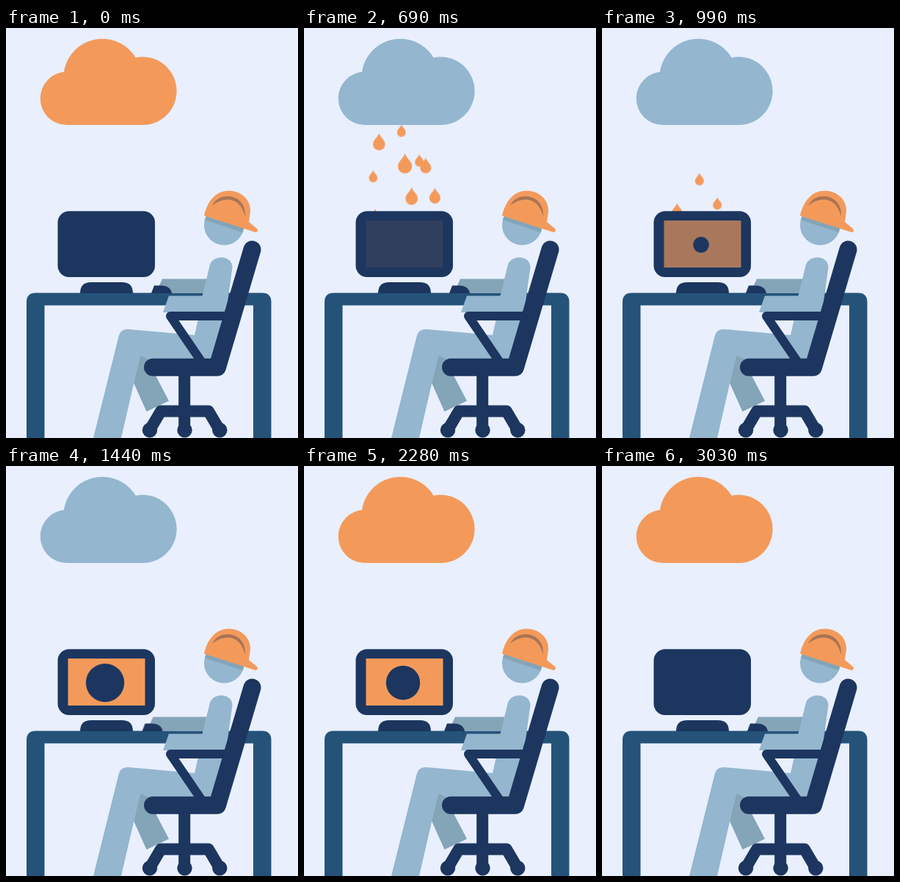
These frames come from a looping animation (398x558 px, 3180 ms). An HTML page without scripts:

```html
<!DOCTYPE html>
<html lang="en">
<head>
<meta charset="utf-8">
<title>Cloud to desk</title>
<style>
  :root {
    --navy: #1c365f;
    --desk: #255279;
    --skin: #94b6cf;
    --shade: #84a4b8;
    --orange: #f39a5b;
  }
  html, body { margin: 0; width: 100%; height: 100%; overflow: hidden; background: #e9effd; }
  svg { display: block; width: 398px; height: 558px; }

  .navy { fill: var(--navy); }
  .desk { fill: var(--desk); }
  .skin { fill: var(--skin); }
  .shade { fill: var(--shade); }
  .orange { fill: var(--orange); }
  .frame { fill: none; stroke: var(--navy); stroke-linecap: round; stroke-linejoin: round; }

  .cloud, .screen, .sweep, .mark, .hand, .drops use { animation: 3180ms linear infinite; }
  .cloud { animation-name: tint; }
  .screen { animation-name: glow; }
  .sweep { animation-name: sweep; fill: #1c365f; opacity: .04; }
  .mark { animation-name: pop; transform-origin: 135px 295px; }
  .hand { animation-name: reach; }

  /* --x, --y: place when the rain is fullest; --v: px per second; --r: size */
  .drops use { animation-name: fall; }

  @keyframes tint {
    0%, 3.77%, 71.07%, 100% { fill: #f39a5b; }
    20.75%, 50% { fill: #94b6cf; }
  }
  @keyframes glow {
    0%, 20.13%, 95.28%, 100% { opacity: 0; }
    36.79%, 80.03% { opacity: 1; }
  }
  @keyframes sweep {
    0%, 55.66% { transform: translate(0, 0); }
    70.75%, 100% { transform: translate(98px, -120px); }
  }
  @keyframes pop {
    0%, 21.38%, 94.34%, 100% { transform: scale(0); }
    45.28% { transform: scale(1.13); }
    50.31%, 84.59% { transform: scale(1); }
  }
  @keyframes reach {
    0%, 28.3%, 94.34%, 100% { transform: translateX(0); }
    45.28% { transform: translateX(-12.5px); }
    50.31%, 84.91% { transform: translateX(-7px); }
  }
  @keyframes fall {
    from { transform: translate(var(--x), calc(var(--y) - var(--v) * .69)) scale(var(--r)); }
    to { transform: translate(var(--x), calc(var(--y) + var(--v) * 2.49)) scale(var(--r)); }
  }
</style>
</head>
<body>
<svg viewBox="0 0 398 558">
  <defs>
    <path id="drop" d="M0-1.85C.25-1.1 1-.75 1 0A1 1 0 0 1-1 0C-1-.75-.25-1.1 0-1.85Z"/>
    <clipPath id="sky"><rect x="70" y="125" width="140" height="130"/></clipPath>
    <clipPath id="glass"><rect x="84.5" y="262" width="105" height="64"/></clipPath>
    <clipPath id="face"><circle cx="297.3" cy="268.3" r="27.3"/></clipPath>
  </defs>

  <g class="drops orange" clip-path="url(#sky)">
    <use href="#drop" style="--x:102.3px;--y:158px;--v:317px;--r:8.2"/>
    <use href="#drop" style="--x:132.8px;--y:142px;--v:220px;--r:6"/>
    <use href="#drop" style="--x:137.6px;--y:188px;--v:340px;--r:9.6"/>
    <use href="#drop" style="--x:157.2px;--y:182.5px;--v:195px;--r:6"/>
    <use href="#drop" style="--x:165.8px;--y:190px;--v:290px;--r:7.5"/>
    <use href="#drop" style="--x:94.3px;--y:204px;--v:205px;--r:5.8"/>
    <use href="#drop" style="--x:146.7px;--y:232px;--v:310px;--r:8.4"/>
    <use href="#drop" style="--x:178.4px;--y:231px;--v:290px;--r:7.6"/>
    <use href="#drop" style="--x:97px;--y:257px;--v:250px;--r:6"/>
  </g>

  <g class="cloud">
    <circle cx="83" cy="95.8" r="36.3"/>
    <circle cx="131.3" cy="67.7" r="53"/>
    <circle cx="186.2" cy="85.7" r="46.4"/>
    <path d="M83 80H186V132.1H83Z"/>
  </g>

  <path class="desk" d="M28 558V373Q28 360.5 40.500 360.500H349Q361.500 360.500 361.500 373V558H337V377.500H52.500V558Z"/>

  <!-- monitor -->
  <path class="navy" d="M101 361Q101 346 116 346H158Q173 346 173 361Z"/>
  <rect class="navy" x="70.500" y="249.200" width="132.500" height="89.800" rx="15.500"/>
  <rect class="screen orange" x="84.500" y="262" width="105" height="64"/>
  <g clip-path="url(#glass)">
    <path class="sweep" d="M24 277.500L152 382L127 412L-1 308Z"/>
  </g>
  <circle class="mark navy" cx="135" cy="295" r="23.200"/>

  <!-- far arm and mouse -->
  <g class="hand">
    <path class="shade" d="M213 341.500H290V361H204Z"/>
    <path class="navy" d="M198 361L202 350.500H212C219 350.500 225 354 226 361Z"/>
  </g>

  <!-- worker -->
  <path class="shade" d="M183 445L215 449L204 473L222 507.500L191.500 522L174 483Z"/>
  <path class="skin" d="M119 558L153.500 420Q156 409 167 410L257 418L262 396L302 380L290 452H196L183 445.500L157 558Z"/>
  <path class="skin" d="M222 364.500H267.500L277.500 324C280 308 309 308 308.500 326L300 387H214Z"/>
  <circle class="skin" cx="297.300" cy="268.300" r="27.300"/>
  <path class="shade" clip-path="url(#face)" d="M268 250L330 270V281L268 260Z"/>
  <path class="orange" d="M270 255.500C275 234 287 221.500 304 221.500C322 222 334 235 333 250L331 264L342.500 273.500Q344 277.500 340 278Z"/>
  <path fill="#a97454" d="M281 242C290 221 328 225 326 256.500C318 226 293 231 281 242Z"/>

  <!-- chair -->
  <g class="frame">
    <path stroke-width="24" d="M335.500 301.500L288 461.800H200"/>
    <path stroke-width="12" d="M302 392H224L267 455"/>
    <path stroke-width="16" d="M196 547L211 521.500H276L291 547M243.200 470V547"/>
  </g>
  <g class="navy">
    <circle cx="196" cy="547.300" r="10.200"/>
    <circle cx="243.500" cy="547.300" r="10.200"/>
    <circle cx="291.300" cy="547.300" r="10.200"/>
  </g>
</svg>
</body>
</html>
```
